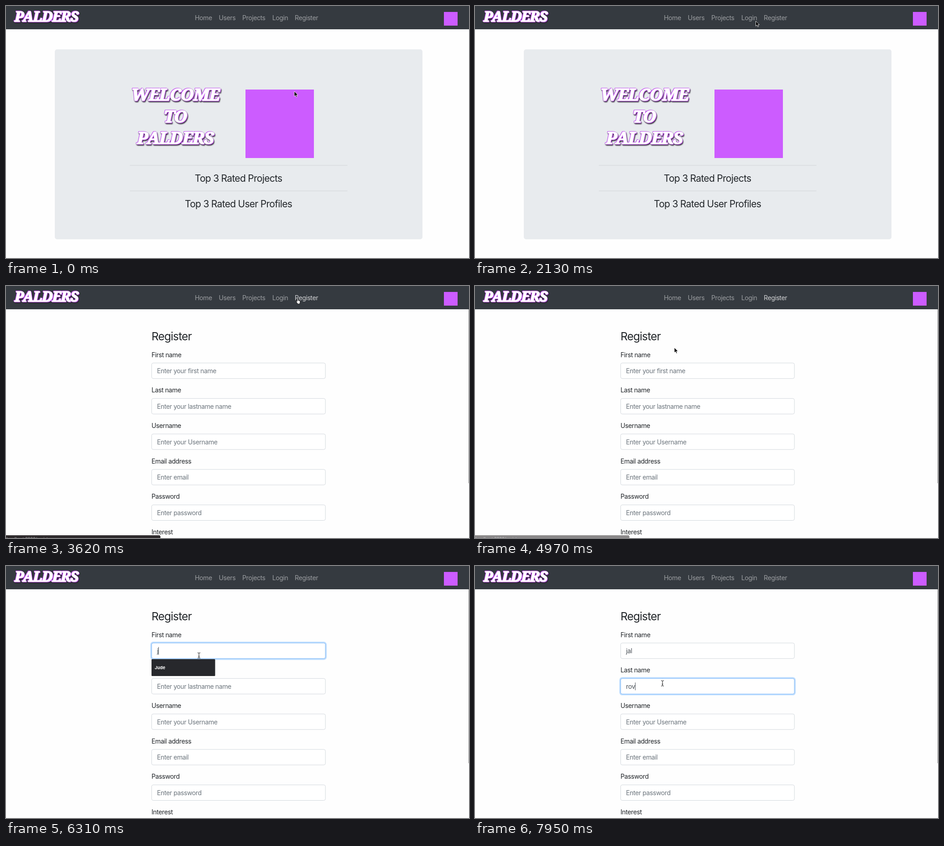
Write an HTML page that moves like this. It is 1015 by 552 pixels and loops after 8 s.

```html
<!DOCTYPE html>
<html lang="en">
<head>
<meta charset="utf-8">
<title>Register</title>
<style>
html, body { margin: 0; width: 100%; height: 100%; overflow: hidden; background: #fefefe; }
svg { display: block; width: 1015px; height: 552px; }
text { font: 14px Inter, sans-serif; letter-spacing: -.028em; fill: #212529; white-space: pre; }
.nav { fill: #fff; fill-opacity: .5; }
.mid { text-anchor: middle; }
.title { font-size: 20.9px; letter-spacing: -.031em; }
.word {
  font: italic 900 37px "Noto Serif", serif; letter-spacing: -1px; text-anchor: middle;
  fill: #fff; stroke: #fff; stroke-width: 1.6px; stroke-linejoin: round;
}
.words {
  filter: drop-shadow(1px 1px 0 #c455f2) drop-shadow(-1px -1px 0 #c455f2) drop-shadow(1px 2.5px 1px #2c2433);
}
.row { font-size: 9.5px; font-weight: 700; letter-spacing: 0; fill: #fff; }
.hint { fill: #6c757d; }
.typed { fill: #495057; }
</style>
</head>
<body>
<svg id="stage" viewBox="0 0 1015 552">
  <g id="home">
    <rect x="107" y="95" width="806" height="416" rx="5" fill="#e8ebee"/>
    <g class="words">
      <text class="word" x="371" y="207">WELCOME</text>
      <text class="word" x="371" y="255">TO</text>
      <text class="word" x="371" y="302">PALDERS</text>
    </g>
    <rect x="525" y="183" width="150" height="150" fill="#cc5cff"/>
    <path d="M271.5 349H748.5M271.5 405H748.5" stroke="#d2d5d8"/>
    <text class="title mid" x="509.5" y="385">Top 3 Rated Projects</text>
    <text class="title mid" x="509.5" y="441">Top 3 Rated User Profiles</text>
  </g>
  <g id="form">
    <text x="319" y="119" style="font-size:24.4px;letter-spacing:-.034em">Register</text>
    <g id="fields"></g>
    <rect x="1014" y="51" width="1" height="381" fill="#8a8a8a"/>
  </g>
  <rect width="1015" height="51" fill="#353a40"/>
  <g class="words"><text class="word" x="88.5" y="34" style="font-size:31px">PALDERS</text></g>
  <rect x="960" y="13" width="30" height="30" fill="#cc5cff"/>
  <text class="nav" x="414" y="30.8">Home</text>
  <text class="nav" x="466.5" y="30.8">Users</text>
  <text class="nav" x="518" y="30.8">Projects</text>
  <text class="nav" x="583.7" y="30.8">Login</text>
  <text class="nav" x="633" y="30.8" id="register">Register</text>
  <g id="menu"></g>
  <g id="status">
    <path d="M0 546H335.5a3 3 0 0 1 3 3V552H0Z" fill="#2f2b2d"/>
    <text x="1" y="557" style="font-size:9px;letter-spacing:0;fill:#a9a6a8">localhost:3000/register</text>
  </g>
  <g id="pointer">
    <path id="arrow" d="M0 0V11L2.6 8.7 4.4 12.7 6.2 11.9 4.5 8H8Z" stroke="#fff" stroke-width=".8"/>
    <path id="hand" d="M2.5 6.5V1.3a1 1 0 0 1 2 0V4.6L8.7 5.6V9L7.5 12.2H3.7L.5 7.5 1.2 6.3Z"
      fill="#fff" stroke="#111" stroke-width=".8"/>
    <path id="beam" d="M-3-6Q0-6 0-4.5Q0-6 3-6M0-4.5V4.5M-3 6Q0 6 0 4.5Q0 6 3 6M-1.5 2H1.5"
      fill="none" stroke="#111"/>
  </g>
</svg>
<script>
const $ = id => document.getElementById(id);
const show = (id, alpha) => $(id).setAttribute('opacity', +alpha);
const PITCH = 77.7, LOOP = 8000;

const labels = ['First name', 'Last name', 'Username', 'Email address', 'Password', 'Interest'];
const hints = ['your first name', 'your lastname name', 'your Username', 'email', 'password'];
const entries = ['Jude', 'Mira', 'Otto', 'Lena', 'Saul'];
const surnames = ['Marlow', 'Tindle', 'Rusk', 'Oakes', 'Venn'];

$('fields').innerHTML = labels.map((label, i) => `<g transform="translate(0 ${i * PITCH})">
  <text x="319" y="155.5">${label}</text>` + (hints[i] ? `
  <rect id="ring${i}" x="317.8" y="167.2" width="383.9" height="37" rx="5"
    fill="none" stroke="#bfdeff" stroke-width="2.9"/>
  <rect x="319.3" y="168.7" width="380.9" height="34" rx="3.6" fill="#fff" stroke="#ced4da" stroke-width=".9"/>
  <rect id="edge${i}" x="319.3" y="168.7" width="380.9" height="34" rx="3.6" fill="none" stroke="#80bdff"/>
  <text id="value${i}" x="331" y="191.3"></text>
  <rect id="caret${i}" y="177.5" width="1" height="17" fill="#495057"/>` : '') + '</g>').join('');

// [start, end, steps, from x, from y, to x, to y]
const moves = [
  [500, 950, 4, 632, 187, 597, 108],
  [1540, 2130, 5, 597, 108, 615.5, 33],
  [2270, 2570, 3, 615.5, 33, 633, 27],
  [3170, 3170, 1, 633, 27, 636, 27],
  [4520, 4970, 4, 636, 27, 437, 135],
  [5120, 5120, 1, 437, 135, 423, 196],
  [6750, 7050, 3, 423, 196, 411, 257]
];

function pointerAt(t) {
  const [start, end, steps, x, y, toX, toY] = moves.filter(m => t >= m[0]).pop() || moves[0];
  const gap = (end - start) / (steps - 1) || 1;
  const done = t < start ? 0 : Math.min(1, (Math.floor((t - start) / gap + .01) + 1) / steps);
  const k = done * done * (3 - 2 * done);
  return [x + (toX - x) * k, y + (toY - y) * k];
}

// Last value whose time has come
const at = (t, ...pairs) => pairs.filter(p => t >= p[0]).pop()?.[1] ?? 0;

function drawField(i, text, focus) {
  const value = $('value' + i);
  value.textContent = text || 'Enter ' + hints[i];
  value.setAttribute('class', text ? 'typed' : 'hint');
  show('ring' + i, focus);
  show('edge' + i, focus);
  show('caret' + i, focus === 1);
  $('caret' + i).setAttribute('x', 331 + (text ? value.getComputedTextLength() : 0));
}

function menu(i, names) {
  const y = 204 + i * PITCH;
  return names.length ? `<rect x="319" y="${y}" width="139.5" height="${10.5 + 26.5 * names.length}" rx="1.5" fill="#27282c"/>`
    + names.map((name, n) => `<text class="row" x="326" y="${y + 22 + 26.5 * n}">${name}</text>`).join('') : '';
}

function draw() {
  const t = performance.now() % LOOP;
  const form = t >= 3620;
  show('home', !form);
  show('form', form);
  $('register').style.fillOpacity = at(t, [0, .5], [3170, .78], [5420, .6], [5570, .5]);
  show('status', at(t, [3620, 1], [4970, .55], [5120, 0]));

  const first = 'jal'.slice(0, at(t, [6170, 1], [6460, 2], [6750, 3]));
  const last = 'rov'.slice(0, at(t, [7350, 1], [7500, 2], [7650, 3]));
  drawField(0, first, at(t, [5420, .5], [5570, 1], [7050, .4], [7200, 0]));
  drawField(1, last, at(t, [7050, .6], [7200, 1]));
  const rows = at(t, [5570, 3], [6310, 1], [6460, 0]);
  const lastRows = at(t, [7200, 5], [7350, 0]);
  $('menu').innerHTML = menu(0, entries.slice(0, rows)) + menu(1, surnames.slice(0, lastRows));

  const kind = at(t, [0, 'arrow'], [2720, 'hand'], [4520, 'arrow'], [5120, 'beam']);
  for (const id of ['arrow', 'hand', 'beam']) show(id, id === kind);
  show('pointer', at(t, [0, 1], [6460, 0], [6750, 1], [7350, 0], [7950, 1]));
  $('pointer').setAttribute('transform', `translate(${pointerAt(t)})`);
  requestAnimationFrame(draw);
}

for (let i = 2; i < hints.length; i++) drawField(i, '', 0);
draw();
</script>
</body>
</html>
```
